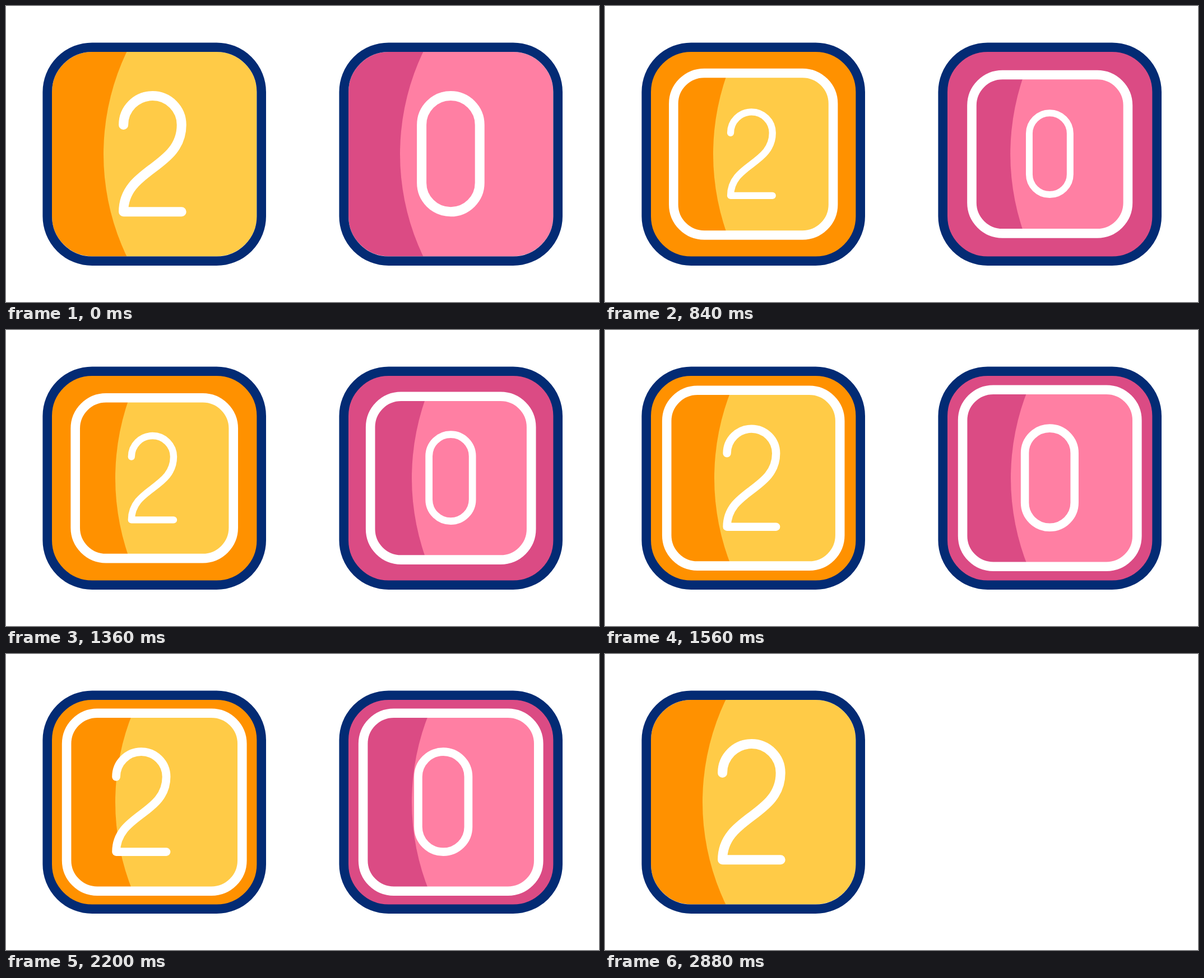
Write an HTML page that moves like this. It is 1058 px wide and 529 px high and loops after 3000 ms.

```html
<!DOCTYPE html>
<html lang="en">
<head>
<meta charset="utf-8">
<title>Counter tiles</title>
<style>
  html, body { margin: 0; height: 100%; overflow: hidden; background: #fff; }
  svg { display: block; width: 100vw; height: 100vh; }
  .line { fill: none; stroke-width: 16.6; }
  .frame { stroke: #032b74; }
  .ring { stroke: #fff; }
  .digit { fill: none; stroke: #fff; stroke-width: 17; stroke-linecap: round; stroke-linejoin: round; }
</style>
</head>
<body>
<svg id="stage" viewBox="0 0 1058 529"></svg>
<script>
const LOOP = 3000, STEP = 40, LAST = 2880;
const CENTER = 264.7, HALF = 182.7, LINE = 16.6, ARC_RADIUS = 425;

const tiles = [
  { x: 0, lead: 0, dark: '#ff9100', light: '#ffcb47', digitX: 261.4, end: LOOP,
    digit: 'M-51.8-51.8a51.8 51.8 0 0 1 103.6 0C51.8 26-51.8 26-51.8 103.5H51.8' },
  { x: 529, lead: STEP, dark: '#db4b84', light: '#ff7fa3', digitX: 264.4, end: LAST,
    digit: 'M-51.8-51.8a51.8 51.8 0 0 1 103.6 0V51.8a51.8 51.8 0 0 1-103.6 0Z' }
];

const stage = document.getElementById('stage');
stage.innerHTML = tiles.map((tile, i) => `
  <g class="tile" transform="translate(${tile.x})">
    <clipPath id="face${i}"><rect class="shape"/></clipPath>
    <rect x="74" y="74" width="381.4" height="381.4" rx="80" fill="${tile.dark}"/>
    <g clip-path="url(#face${i})"><circle class="arc" cy="${CENTER}" r="${ARC_RADIUS}" fill="${tile.light}"/></g>
    <rect class="shape line ring"/>
    <path class="digit" d="${tile.digit}"/>
    <rect class="line frame" x="73.7" y="73.7" width="382" height="382" rx="80"/>
  </g>`).join('');

const groups = [...stage.querySelectorAll('.tile')];
const clamp = v => Math.min(1, Math.max(0, v));
const cubic = u => u < 0.5 ? 4 * u ** 3 : 1 - 4 * (1 - u) ** 3;
const ease = (t, from, to) => cubic(clamp((t - from) / (to - from)));
const smooth = u => u * u * (3 - 2 * u);

const shakeKeys = [[1690, 0], [1810, -22], [1990, 22], [2171, -22], [2331, 0]];
function shake(t) {
  for (let i = 1; i < shakeKeys.length; i++) {
    const [t0, x0] = shakeKeys[i - 1], [t1, x1] = shakeKeys[i];
    if (t >= t0 && t < t1) return x0 + (x1 - x0) * smooth((t - t0) / (t1 - t0));
  }
  return 0;
}

function setAttrs(node, attrs) {
  for (const name in attrs) node.setAttribute(name, attrs[name]);
}

function pose(group, tile, time) {
  const t = time + tile.lead;
  const shrink = ease(t, 470, 990);
  const rebound = ease(t, 1140, 1740);
  const restore = ease(t, 2240, 2760);

  const inset = 53.8 * shrink - 19.4 * rebound - 34.4 * restore;
  const halfX = HALF - inset + LINE / 2;
  const halfY = halfX + 2.4 * clamp((inset - 14) / 16);
  const shape = {
    x: CENTER - halfX, y: CENTER - halfY, width: 2 * halfX, height: 2 * halfY,
    rx: Math.max(46.5, 72 - inset) + LINE / 2
  };
  group.querySelectorAll('.shape').forEach(node => setAttrs(node, shape));

  const arcLeft = 174 + 21 * (shrink - restore);
  setAttrs(group.querySelector('.arc'), { cx: arcLeft + ARC_RADIUS });

  const scale = 1 - 0.308 * shrink + 0.172 * rebound + 0.136 * restore;
  setAttrs(group.querySelector('.digit'), {
    transform: `translate(${tile.digitX + shake(t)} 264.2) scale(${scale})`
  });
  group.style.visibility = time < tile.end ? 'visible' : 'hidden';
}

function render(now) {
  const time = Math.min(LAST, Math.floor((now % LOOP) / STEP) * STEP);
  groups.forEach((group, i) => pose(group, tiles[i], time));
}

const start = performance.now();
function tick() {
  render(performance.now() - start);
  requestAnimationFrame(tick);
}
tick();
</script>
</body>
</html>
```
